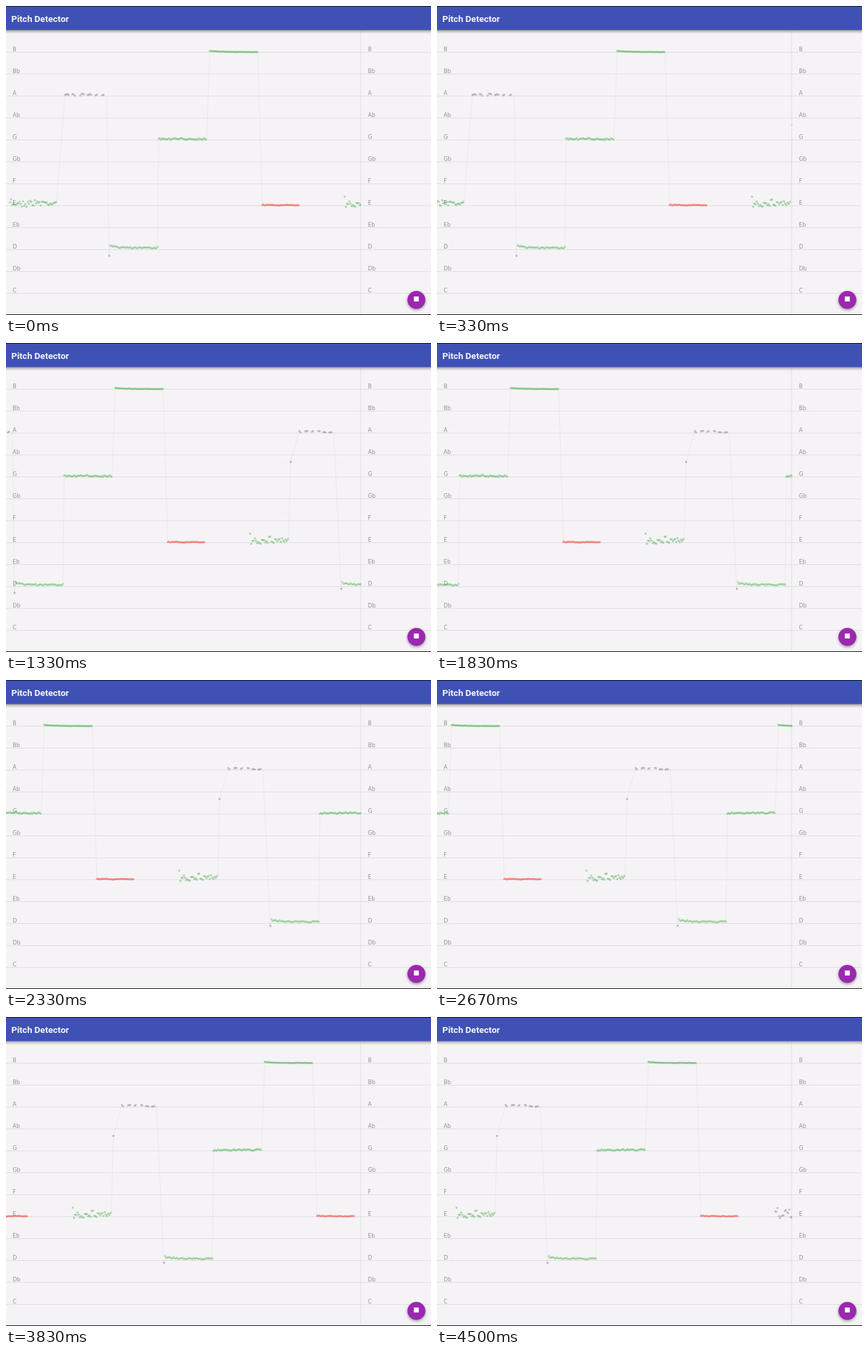
Recreate the animation shown at these times as an HTML page. Size 640 px wide and 465 px high, loop 4.67 s.

```html
<!DOCTYPE html>
<html lang="en">
<head>
<meta charset="utf-8">
<title>Pitch Detector</title>
<style>
  html, body { margin: 0; width: 100%; height: 100%; overflow: hidden; background: #f5f3f6; }
  svg { display: block; }
  .note { font: 8.3px "DejaVu Sans", sans-serif; fill: #929094; }
  .title { font: 700 13.5px Roboto, sans-serif; fill: #f6f7fc; }
</style>
</head>
<body>
<svg width="640" height="465" viewBox="0 0 640 465">
  <defs>
    <linearGradient id="shade" x2="0" y2="1">
      <stop offset="0" stop-color="#000" stop-opacity=".45"/>
      <stop offset=".4" stop-color="#000" stop-opacity=".17"/>
      <stop offset="1" stop-color="#000" stop-opacity="0"/>
    </linearGradient>
    <filter id="blur" x="-50%" y="-50%" width="200%" height="200%">
      <feGaussianBlur stdDeviation="2"/>
    </filter>
    <clipPath id="plot"><rect y="37" width="535" height="427"/></clipPath>
  </defs>
  <rect width="640" height="465" fill="#f5f3f6"/>
  <g id="grid"></g>
  <path d="M534 37V464" stroke="#e0dee1"/>
  <g clip-path="url(#plot)"><g id="trace"></g></g>
  <rect y="36" width="640" height="6" fill="url(#shade)"/>
  <rect width="640" height="36" fill="#3f51b5"/>
  <rect width="640" height="1" fill="#10142c"/>
  <text class="title" x="8" y="23.8">Pitch Detector</text>
  <circle cx="618" cy="444" r="13.5" opacity=".4" filter="url(#blur)"/>
  <circle cx="618" cy="442.2" r="13.5" fill="#9c27b0"/>
  <rect x="614.2" y="437.2" width="7.4" height="7.4" fill="#fff"/>
  <rect y="464" width="640" height="1" fill="#121214"/>
</svg>
<script>
const NS = "http://www.w3.org/2000/svg";
const GREEN = "#4caf50", RED = "#f44336", GREY = "#85838a";
const LOOP = 4670, STEP = 1000 / 6, LAST = 27;
const SPEED = 17.8;   // px scrolled per step
const PERIOD = 492;   // px between two passes of the melody
const SAMPLE = 1.78;  // px between two readings
const grid = document.getElementById("grid");
const trace = document.getElementById("trace");

function add(parent, tag, attrs, text) {
  const el = document.createElementNS(NS, tag);
  for (const key in attrs) el.setAttribute(key, attrs[key]);
  if (text) el.textContent = text;
  parent.appendChild(el);
}

let seed = 7;
function rand() {
  seed = (seed * 16807) % 2147483647;
  return seed / 2147483647;
}
const spread = () => rand() + rand() - 1;

function dot(cx, cy, fill, opacity) {
  add(trace, "circle", { cx, cy, r: 1.65, fill, opacity });
}

function link(d) {
  add(trace, "path", { d, fill: "none", stroke: "#8a888c", "stroke-width": 0.8, opacity: 0.13 });
}

// Held note: settles from y + rise to y
function held(x0, x1, y, rise, wobble, fill, opacity) {
  for (let x = x0; x <= x1 + 0.5; x += SAMPLE) {
    dot(x, y + rise * Math.exp((x0 - x) / 14) + spread() * wobble, fill, opacity);
  }
}

// Unsteady note: loose at first, then closer to the pitch
function loose(x0, x1, fill) {
  for (let x = x0; x <= x1; x += SAMPLE) {
    const reach = 6 + 6 * Math.exp((x0 - x) / 12);
    dot(x, 296.5 + spread() * reach, fill, 0.42);
  }
}

// Broken note: short runs of readings with gaps
function broken(x0, x1, y) {
  for (let x = x0; x < x1; x += 3 + rand() * 4) {
    const end = Math.min(x1, x + 2 + rand() * 5);
    for (; x <= end; x += SAMPLE) dot(x, y + spread() * 2, GREY, 0.42);
  }
}

function melody({ dx, start, a0, a1, dip, skip, tone }) {
  const at = x => x + dx;
  const rise = skip ? `L${at(79)} 179` : "";
  link(`M${at(76)} 297${rise}L${at(a0)} 132M${at(a1)} 134L${at(155)} ${dip}L${at(157)} 361` +
    `M${at(228)} 362L${at(230)} 201M${at(302)} 202L${at(307)} 68M${at(379)} 69L${at(386)} 299`);
  loose(at(start), at(76), tone);
  if (skip) dot(at(79), 179, GREY, 0.5);
  broken(at(a0), at(a1), 133.5);
  dot(at(155.3), dip, GREY, 0.5);
  held(at(157), at(228), 363.8, -3, 1.6, GREEN, 0.37);
  held(at(230), at(302), 200, 0.6, 1.6, GREEN, 0.41);
  held(at(307), at(379), 69.2, -1.7, 0.3, GREEN, 0.45);
  held(at(386), at(441), 299.8, -0.4, 0.7, RED, 0.44);
}

"B Bb A Ab G Gb F E Eb D Db C".split(" ").forEach((name, i) => {
  const y = 69.5 + i * 33;
  add(grid, "path", { d: `M0 ${y}H640`, stroke: "#e0dee1" });
  for (const x of [10, 545]) add(grid, "text", { class: "note", x, y: y - 1.3 }, name);
});

melody({ dx: 0, start: 6, a0: 89, a1: 152, dip: 376, skip: false, tone: GREEN });
melody({ dx: PERIOD, start: 18, a0: 92, a1: 144, dip: 370, skip: true, tone: GREEN });
melody({ dx: 2 * PERIOD, start: 6, a0: 89, a1: 152, dip: 376, skip: false, tone: GREY });

function draw(now) {
  const k = Math.min(LAST, Math.floor((now % LOOP + 4) / STEP));
  trace.setAttribute("transform", `translate(${-k * SPEED} 0)`);
}

const start = performance.now();
function tick() {
  draw(performance.now() - start);
  requestAnimationFrame(tick);
}
tick();
</script>
</body>
</html>
```
